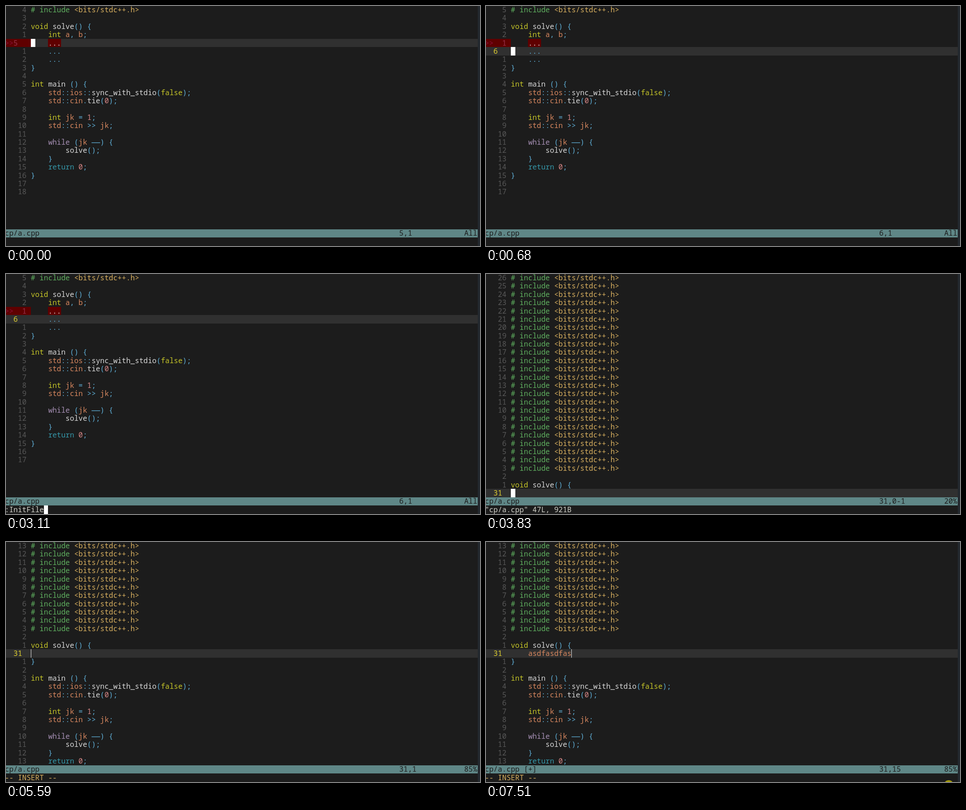
These frames come from a looping animation (1050 px wide and 533 px high, 7580 ms). An HTML page with a canvas:

```html
<!DOCTYPE html>
<html lang="en">
<head>
<meta charset="utf-8">
<title>Editor session</title>
<style>
html, body { margin: 0; width: 100%; height: 100%; overflow: hidden; background: #1c1c1c; }
canvas { display: block; }
</style>
</head>
<body>
<canvas id="stage" width="1050" height="533"></canvas>
<script>
const ctx = document.getElementById('stage').getContext('2d');
const LOOP = 7580, CELL = 9.6, LEFT = -2.6, ROW = 18.38, EDGE = 1045;
const GUTTER = 6, STATUS = 27, COMMAND = 28;

const include = '# include <bits/stdc++.h>';
const mainCode = `}

int main () {
    std::ios::sync_with_stdio(false);
    std::cin.tie(0);

    int jk = 1;
    std::cin >> jk;

    while (jk \u2014\u2014) {
        solve();
    }
    return 0;
}

`.split('\n');
const draft = [include, '', 'void solve() {', '    int a, b;', '    ...', '    ...', '    ...', ...mainCode];
const template = [...Array(28).fill(include), '', 'void solve() {', '', ...mainCode];

// Syntax colours, first match wins
const syntax = [
  [/^<bits.*>/, '#d7af5f'],
  [/^# include/, '#5faf5f'],
  [/^(void|int|false)\b/, '#c5c528'],
  [/^while\b/, '#a68fb4'],
  [/^return\b/, '#3598aa'],
  [/^\d+/, '#d78787'],
  [/^(solve|main|sync_with_stdio|tie)\b/, '#d8d8d8'],
  [/^\w+/, '#d7875f'],
  [/^ +/, '#000'],
  [/^[^\w\s]/, '#5fafd7']
];

const colX = col => LEFT + col * CELL;
const rowY = row => Math.round(row * ROW - 0.5);

function fill(x0, y0, x1, y1, color) {
  ctx.fillStyle = color;
  ctx.fillRect(x0, y0, x1 - x0, y1 - y0);
}

function cells(row, from, to, color) {
  fill(Math.round(colX(from)), rowY(row), Math.round(colX(to)), rowY(row + 1), color);
}

function text(str, row, col, color) {
  ctx.fillStyle = color;
  ctx.fillText(str, colX(col), row * ROW + 14);
}

function code(line, row) {
  let col = GUTTER;
  while (line) {
    const [rule, color] = syntax.find(([rule]) => rule.test(line));
    const token = line.match(rule)[0];
    text(token, row, col, color);
    col += token.length;
    line = line.slice(token.length);
  }
}

// Everything the editor shows at time t
function stateAt(t) {
  if (t < 3760) {
    const keys = t < 2440 ? 0 : 1 + Math.floor((t - 2440) / 75);
    const line = t < 350 ? 5 : 6;
    return {
      lines: draft, first: 1, line, sign: 5, file: 'cp/a.cpp', place: line + ',1', scroll: 'All',
      command: ':InitFile'.slice(0, keys), cursor: keys ? 'command' : 'block'
    };
  }
  const insert = t >= 5500, indented = t >= 6500, centred = t >= 5100;
  const count = t < 6900 ? 0 : Math.min(10, 1 + Math.floor((t - 6900) / 67.7));
  const lines = template.slice();
  if (indented) lines[30] = '    ' + 'asdfasdfas'.slice(0, count);
  return {
    lines, first: centred ? 18 : 5, line: 31,
    file: 'cp/a.cpp' + (indented ? ' [+]' : ''),
    place: '31,' + (insert ? lines[30].length + 1 : '0-1'),
    scroll: centred ? '85%' : '20%',
    command: insert ? '-- INSERT --' : '"cp/a.cpp" 47L, 921B',
    pending: t >= 5040 && !centred ? 'z' : '',
    cursor: insert ? 'bar' : 'block'
  };
}

function drawLine(s, row) {
  const number = s.first + row, line = s.lines[number - 1];
  if (line === undefined) return;
  const current = number === s.line, marked = number === s.sign;
  if (current) fill(0, rowY(row), EDGE, rowY(row + 1), '#303030');
  if (marked) {
    cells(row, 0, GUTTER, '#5f0000');
    cells(row, 10, 13, '#5f0000');
    text('>>', row, 0, '#8a1038');
  }
  const label = current ? String(number).padStart(2 - (number < 10)) : String(Math.abs(number - s.line)).padStart(3);
  text(label, row, 2, marked ? '#96304a' : current ? '#e0d030' : '#585858');
  if (marked) text(line, row, GUTTER, '#e4d4d4');
  else code(line, row);
  if (!current) return;
  if (s.cursor === 'block') cells(row, GUTTER, GUTTER + 1, '#fff');
  if (s.cursor === 'bar') {
    const x = Math.round(colX(GUTTER + line.length));
    fill(x, rowY(row), x + 1, rowY(row + 1), '#e8e8e8');
  }
}

function draw(t) {
  const s = stateAt(t);
  fill(0, 0, 1050, 533, '#1c1c1c');
  for (let row = 0; row < STATUS; row++) drawLine(s, row);

  fill(0, rowY(STATUS), EDGE, rowY(COMMAND), '#5f8787');
  text(s.file, STATUS, 0, '#1c1c1c');
  text(s.place, STATUS, 91, '#1c1c1c');
  text(s.scroll, STATUS, 106, '#1c1c1c');

  text(s.command, COMMAND, 0, s.cursor === 'bar' ? '#d7af5f' : '#d0d0c8');
  if (s.pending) text(s.pending, COMMAND, 98, '#d0d0c8');
  if (s.cursor === 'command') cells(COMMAND, s.command.length, s.command.length + 1, '#fff');

  fill(EDGE, 0, 1050, 533, '#23282e');
  if (t >= 7510) {
    ctx.fillStyle = '#a39a10';
    ctx.beginPath();
    ctx.arc(1025, 540, 11, 0, 2 * Math.PI);
    ctx.fill();
  }
}

ctx.font = '16px "Noto Sans Mono", "DejaVu Sans Mono", monospace';
const start = performance.now();
function tick() {
  draw((performance.now() - start) % LOOP);
  requestAnimationFrame(tick);
}
tick();
</script>
</body>
</html>
```
